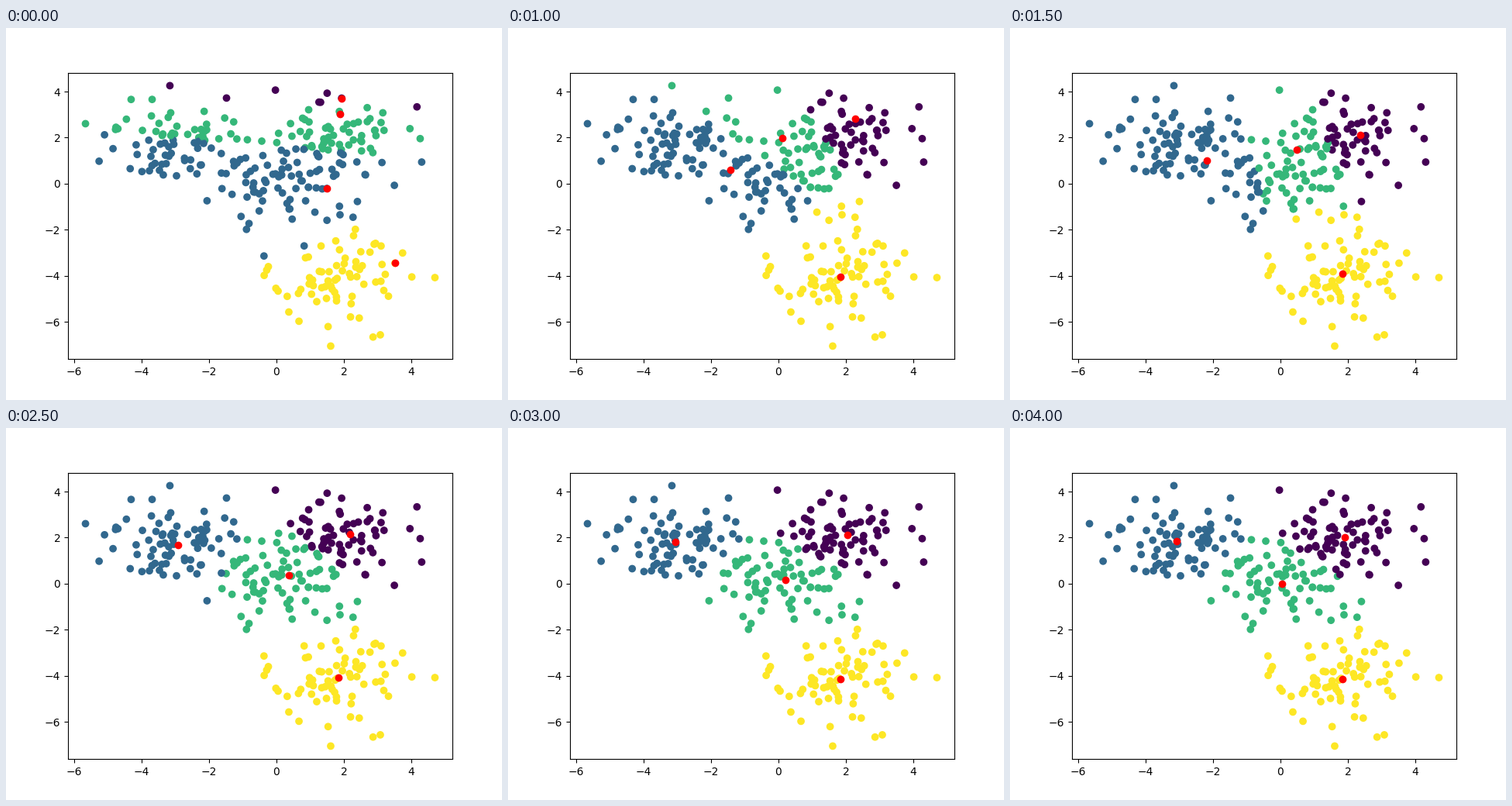
Animation of 640 by 480 pixels, one loop 4.5 s. Source, as a matplotlib script:

```python
import numpy as np
import matplotlib.pyplot as plt
from matplotlib.animation import FuncAnimation

STEPS = 9
STEP_MS = 500
BLOBS = [(0, 0), (2, 2), (-3, 2), (2, -4)]
SEEDS = [(1.93, 3.71), (1.50, -0.20), (1.89, 3.01), (3.52, -3.45)]


def make_points(per_blob=75):
    rng = np.random.RandomState(0)
    pts = np.vstack([rng.normal(loc=c, scale=1.0, size=(per_blob, 2))
                     for c in BLOBS])
    order = np.arange(len(pts))
    rng.shuffle(order)
    return pts[order]


def distances(a, b):
    return np.linalg.norm(a[:, None] - b[None], axis=2)


def kmeans(pts, centers, steps):
    """Return the (centers, labels) pair of every Lloyd iteration."""
    history = []
    for _ in range(steps):
        labels = distances(pts, centers).argmin(axis=1)
        history.append((centers, labels))
        centers = np.array([pts[labels == k].mean(axis=0)
                            for k in range(len(centers))])
    return history


points = make_points()
# Each starting center is the data point closest to its seed.
start = points[distances(np.array(SEEDS), points).argmin(axis=1)]
history = kmeans(points, start, STEPS)

fig, ax = plt.subplots(figsize=(6.4, 4.8), dpi=100)
dots = ax.scatter(points[:, 0], points[:, 1], c=history[0][1],
                  cmap="viridis", vmin=0, vmax=3)
means = ax.scatter(start[:, 0], start[:, 1], c="r")


def update(i):
    centers, labels = history[i]
    dots.set_array(labels)
    means.set_offsets(centers)
    return dots, means


anim = FuncAnimation(fig, update, frames=STEPS, interval=STEP_MS,
                     init_func=lambda: update(0), repeat=True)
plt.show()
```
